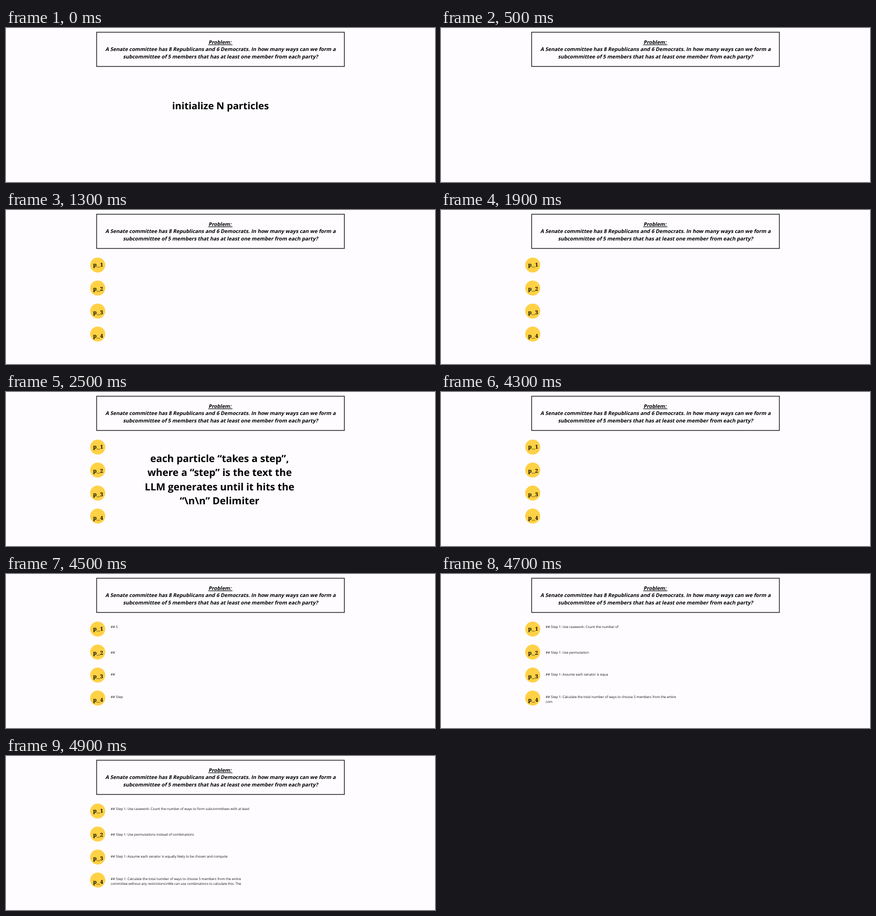
Write an HTML page that moves like this. It is 800 px wide and 288 px high and loops after 5 s.

```html
<!DOCTYPE html>
<html lang="en">
<head>
<meta charset="utf-8">
<title>Particles</title>
<style>
html, body { margin: 0; width: 100%; height: 100%; overflow: hidden; background: #fefcff; }
svg { display: block; }
text { font-family: "Open Sans", "Noto Sans", sans-serif; text-rendering: geometricPrecision; white-space: pre; }
.mid { text-anchor: middle; font-weight: 700; }
.problem { font-size: 9.55px; }
.label { font: 700 10px "Noto Serif", "Liberation Serif", serif; text-anchor: middle; }
.bar { font: 700 11px "Liberation Mono", monospace; }
.step { font-size: 6.25px; }
</style>
</head>
<body>
<svg id="stage" width="800" height="288" viewBox="0 0 800 288">
  <rect x="169" y="7.9" width="462" height="64" fill="none" stroke="#111" stroke-width="1.3"/>
</svg>
<script>
const LOOP = 5000, TICK = 100;
const TYPE_START = 4480, TYPE_TIME = 420;
const stage = document.getElementById("stage");

function add(parent, tag, attrs, content = "") {
  const el = document.createElementNS("http://www.w3.org/2000/svg", tag);
  for (const name in attrs) el.setAttribute(name, attrs[name]);
  el.textContent = content;
  return parent.appendChild(el);
}

const group = () => add(stage, "g", {});
const show = (el, on) => el.setAttribute("visibility", on ? "visible" : "hidden");

[
  "Problem:\u00a0",
  "A Senate committee has 8 Republicans and 6 Democrats. In how many ways can we form a",
  "subcommittee of 5 members that has at least one member from each party?"
].forEach((line, i) => add(stage, "text", {
  class: "mid problem",
  transform: `translate(400 ${30 + i * 13.4}) skewX(-12)`,
  "text-decoration": i ? "none" : "underline"
}, line));

const intro = group();
add(intro, "text", { class: "mid", x: 400, y: 152.4, "font-size": 18.1 }, "initialize N particles");

const note = group();
[
  "each particle “takes a step”,",
  "where a “step” is the text the",
  "LLM generates until it hits the",
  "“\\n\\n” Delimiter"
].forEach((line, i) => add(note, "text", {
  class: "mid", x: 398.3, y: 131.2 + i * 26.2, "font-size": 18.6
}, line));

const particles = group();
for (let i = 0; i < 4; i++) {
  add(particles, "circle", { cx: 171, cy: 103 + i * 43, r: 14, fill: "#ffd145" });
  const label = add(particles, "text", { class: "label", x: 171.8, y: 106.2 + i * 44.4 }, "p");
  add(label, "tspan", { class: "bar" }, "_");
  add(label, "tspan", {}, i + 1);
}

const steps = [
  [101.3, "Use casework: Count the number of ways to form subcommittees with at least"],
  [148.6, "Use permutations instead of combinations"],
  [190.1, "Assume each senator is equally likely to be chosen and compute"],
  [232.1, "Calculate the total number of ways to choose 5 members from the entire\n" +
    "committee without any restrictions\\nWe can use combinations to calculate this. The"]
].map(([y, body]) => ({
  text: "## Step 1: " + body,
  rows: [0, 8.5].map(dy => add(stage, "text", { class: "step", x: 195.3, y: y + dy, fill: "#111" }))
}));

function draw(now) {
  const t = Math.floor((now % LOOP) / TICK) * TICK;
  show(intro, t < 500);
  show(particles, t >= 1100);
  show(note, t >= 2100 && t < 4300);

  // All steps are typed over the same span, so longer ones run faster.
  const typed = Math.min(1, Math.max(0, (t - TYPE_START) / TYPE_TIME));
  for (const { text, rows } of steps) {
    const lines = text.slice(0, Math.floor(text.length * typed)).split("\n");
    rows.forEach((row, i) => row.textContent = lines[i] || "");
  }
}

const start = performance.now();
function loop() {
  draw(performance.now() - start);
  requestAnimationFrame(loop);
}
loop();
</script>
</body>
</html>
```
